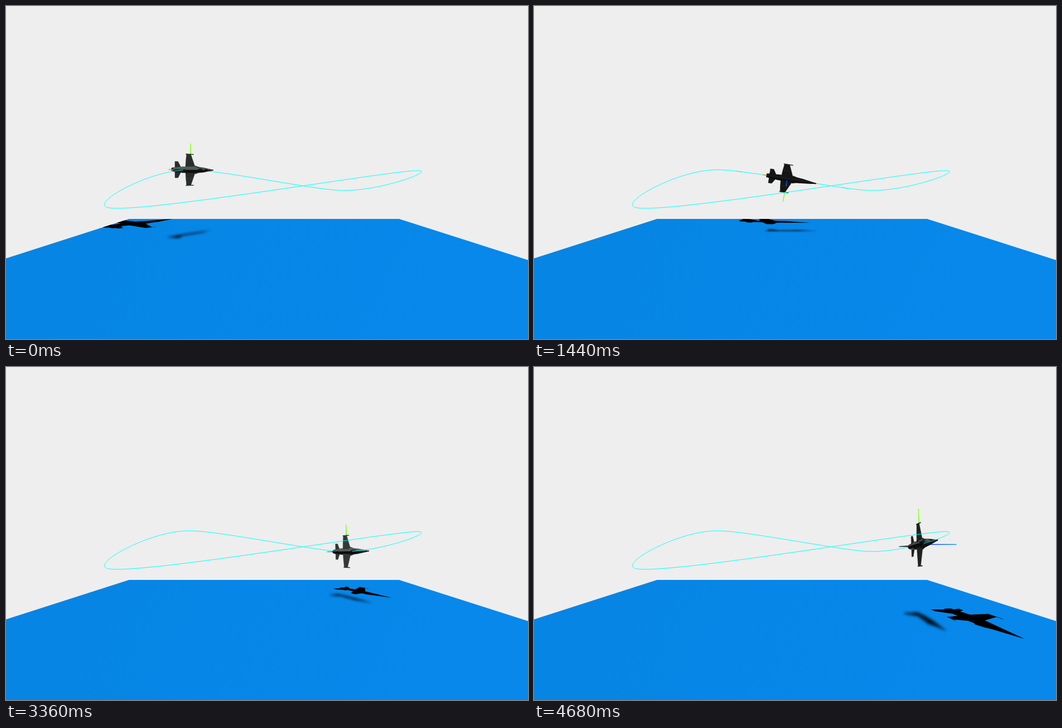
These frames come from a looping animation (936 px wide and 599 px high, 4800 ms). An HTML page with a canvas:

```html
<!DOCTYPE html>
<html lang="en">
<head>
<meta charset="utf-8">
<title>Jet on a looping path</title>
<style>
  html, body { margin: 0; width: 100%; height: 100%; overflow: hidden; background: #eee; }
  canvas { display: block; }
</style>
</head>
<body>
<canvas id="stage" width="936" height="599"></canvas>
<script>
const ctx = document.getElementById('stage').getContext('2d');
const LOOP = 4800, STEP = 120, SEGMENT = 3070;

// World: camera at the origin, x right, y up, z towards the viewer
const FOCAL = 642, CENTER_X = 463, HORIZON = 306, FLOOR = -2.25;
const LAMP = [1.15, 3.15, -9.7], HIGH_LAMP = [0, 42, -10], SHADE_DIR = [-.08, .8, .33];
const KNOTS = [[-2.8, .24, -13.6], [2.8, -.54, -13.6], [2.8, .1, -6.5], [-2.85, -.57, -6.5]];

const ground = new Path2D('M220.5 383H705L936 457V599H0V454Z');
const water = ctx.createLinearGradient(150, 383, 700, 640);
water.addColorStop(0, '#0685e4');
water.addColorStop(1, '#0788ea');

const mix = (m, a, n, b) => a.map((v, i) => m * v + n * b[i]);
const dot = (a, b) => a.reduce((sum, v, i) => sum + v * b[i], 0);
const cross = (a, b) => [a[1] * b[2] - a[2] * b[1], a[2] * b[0] - a[0] * b[2], a[0] * b[1] - a[1] * b[0]];
const unit = a => a.map(v => v / (Math.hypot(...a) || 1));
const project = ([x, y, z]) => [CENTER_X - FOCAL * x / z, HORIZON + FOCAL * y / z];

// Closed Catmull-Rom curve, one knot per unit of u
function trackPoint(u) {
  const i = Math.floor(u), f = u - i;
  const [a, b, c, d] = [-1, 0, 1, 2].map(k => KNOTS[(i + k + 8) % 4]);
  return b.map((p, j) => p + f / 2 * (c[j] - a[j] +
    f * (2 * a[j] - 5 * p + 4 * c[j] - d[j] + f * (3 * (p - c[j]) + d[j] - a[j]))));
}
const track = Array.from({ length: 401 }, (_, i) => trackPoint(i / 100));

// Jet model: x forward, y along the wing, z out of the canopy
const faces = [];
const face = (shade, ...pts) => faces.push({ shade, pts });

function tube(rings, sides, shades) {
  const at = ([x, r, z], i) => {
    const a = i / sides * 2 * Math.PI;
    return [x, r * Math.cos(a), z + r * Math.sin(a)];
  };
  for (let k = 0; k + 1 < rings.length; k++)
    for (let i = 0; i < sides; i++)
      face(shades[i % shades.length], at(rings[k], i), at(rings[k], i + 1),
        at(rings[k + 1], i + 1), at(rings[k + 1], i));
}

function buildJet() {
  tube([[-.83, .07, 0], [-.35, .11, 0], [.25, .12, .01], [.65, .085, .01], [1.2, .004, -.03]], 8, [.5, .85]);
  tube([[.3, .02, .1], [.45, .065, .1], [.62, .055, .08], [.82, .01, .04]], 6, [.12]);
  for (const s of [1, -1]) {
    const flat = (shade, ...xy) => face(shade, ...xy.map(([x, y]) => [x, y * s, 0]));
    flat(1, [-.24, .08], [.24, .08], [.13, .33], [-.22, .33]);
    flat(1, [-.22, .33], [.13, .33], [.02, .58], [-.19, .58]);
    flat(.9, [.22, .1], [.5, .08], [.23, .16]);
    flat(.4, [-.22, .58], [.15, .58], [.15, .6], [-.22, .6]);
    flat(.95, [-.72, .07], [-.44, .07], [-.58, .3], [-.72, .3]);
  }
  face(.8, [-.76, 0, .06], [-.3, 0, .08], [-.58, 0, .36], [-.76, 0, .36]);
}
buildJet();

// Position, heading and rolled axes after t milliseconds
function pose(t) {
  const u = t / SEGMENT, pos = trackPoint(u);
  const fwd = unit(mix(1, trackPoint(u + .002), -1, pos));
  const away = unit(cross([0, 1, 0], fwd)), up = cross(fwd, away);
  const turn = Math.min(u, 1) * 2 * Math.PI, roll = turn - .4 * Math.sin(turn);
  const c = Math.cos(roll), s = Math.sin(roll);
  return { pos, fwd, wing: mix(c, up, s, away), belly: mix(c, away, -s, up) };
}

const toWorld = ({ pos, fwd, wing, belly }, [x, y, z]) =>
  pos.map((p, i) => p + x * fwd[i] + y * wing[i] - z * belly[i]);

function tracePolygon(path, pts) {
  pts.forEach((p, i) => i ? path.lineTo(...p) : path.moveTo(...p));
  path.closePath();
}

// Union of all faces thrown from a lamp onto the floor, wound the same way
function shadowPath(jet, lamp) {
  const path = new Path2D();
  for (const { pts } of faces) {
    const flat = pts.map(p => {
      const v = toWorld(jet, p), k = (lamp[1] - FLOOR) / (lamp[1] - v[1]);
      return project(mix(1 - k, lamp, k, v));
    });
    const area = flat.reduce((sum, p, i) => {
      const q = flat[(i + 1) % flat.length];
      return sum + p[0] * q[1] - q[0] * p[1];
    }, 0);
    tracePolygon(path, area < 0 ? flat.reverse() : flat);
  }
  return path;
}

function drawShadows(jet) {
  ctx.save();
  ctx.clip(ground);
  ctx.fillStyle = '#000';
  ctx.fill(shadowPath(jet, LAMP));
  ctx.filter = `blur(${-26 / jet.pos[2]}px)`;
  ctx.globalAlpha = .85;
  ctx.fill(shadowPath(jet, HIGH_LAMP));
  ctx.restore();
}

function paintFace(jet, { shade, pts }) {
  const v = pts.map(p => toWorld(jet, p));
  const middle = [0, 1, 2].map(i => v.reduce((sum, p) => sum + p[i], 0) / v.length);
  const raw = unit(cross(mix(1, v[1], -1, v[0]), mix(1, v[2], -1, v[0])));
  const n = dot(raw, middle) > 0 ? raw.map(c => -c) : raw;
  const light = Math.max(0, dot(n, SHADE_DIR)) * (dot(n, jet.belly) > .05 ? .12 : 1);
  const tone = (20 + 180 * light) * (.3 + .7 * shade);
  return { depth: middle[2], pts: v.map(project), color: `rgb(${tone * .9},${tone},${tone * .95})` };
}

function axisParts(jet, dir, color, pieces = 10) {
  return Array.from({ length: pieces }, (_, i) => {
    const ends = [i, i + 1].map(k => mix(1, jet.pos, k / pieces, dir));
    return {
      line: true, color: color(Math.round(153 * (i + .5) / pieces)),
      depth: (ends[0][2] + ends[1][2]) / 2 - .1, pts: ends.map(project)
    };
  });
}

function drawJet(jet) {
  const parts = [
    ...faces.map(f => paintFace(jet, f)),
    ...axisParts(jet, jet.fwd.map(c => -c), g => `rgb(255,${g},0)`),
    ...axisParts(jet, jet.wing, r => `rgb(${r},255,0)`),
    ...axisParts(jet, jet.belly, g => `rgb(0,${g},255)`)
  ].sort((a, b) => a.depth - b.depth);
  for (const part of parts) {
    const path = new Path2D();
    tracePolygon(path, part.pts);
    ctx.fillStyle = ctx.strokeStyle = part.color;
    ctx.lineWidth = part.line ? 1 : .4;
    if (!part.line) ctx.fill(path);
    ctx.stroke(path);
  }
}

function drawTrack(visible) {
  ctx.beginPath();
  let drawing = false;
  for (const p of track) {
    const on = visible(p[2]);
    if (on) ctx[drawing ? 'lineTo' : 'moveTo'](...project(p));
    drawing = on;
  }
  ctx.strokeStyle = '#0ff';
  ctx.lineWidth = 1;
  ctx.stroke();
}

function render(t) {
  const jet = pose(t), front = jet.pos[2] + .3;
  ctx.fillStyle = '#eee';
  ctx.fillRect(0, 0, 936, 599);
  ctx.fillStyle = water;
  ctx.fill(ground);
  drawShadows(jet);
  drawTrack(z => z < front + .15);
  drawJet(jet);
  drawTrack(z => z >= front);
}

const start = performance.now();
function tick() {
  const t = (performance.now() - start) % LOOP;
  render(Math.floor(t / STEP) * STEP);
  requestAnimationFrame(tick);
}
tick();
</script>
</body>
</html>
```
